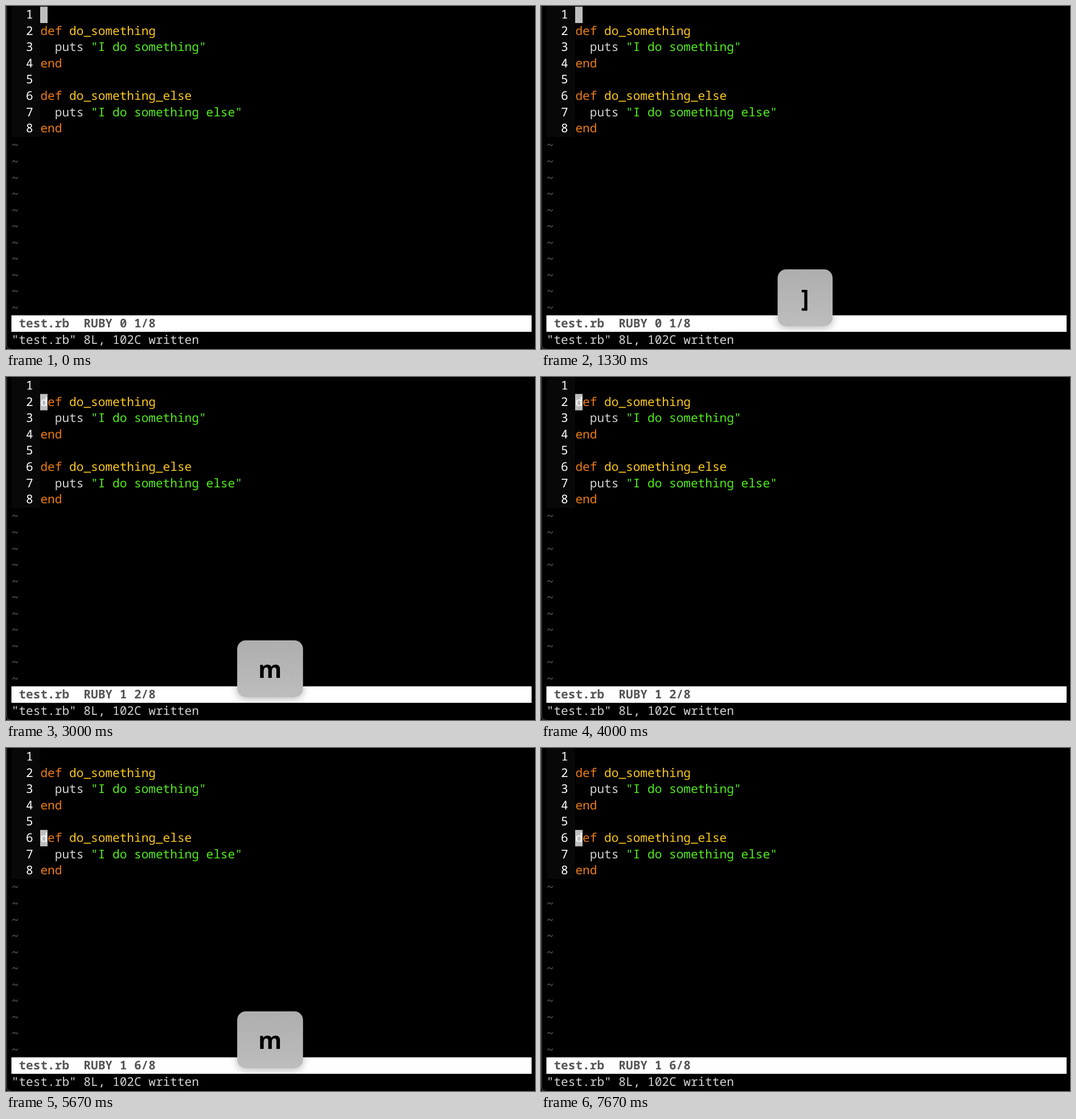
Recreate the animation shown at these times as an HTML page. Size 929 by 603 pixels, loop 8000 ms.

```html
<!DOCTYPE html>
<html lang="en">
<head>
<meta charset="utf-8">
<style>
html, body { margin: 0; width: 100%; height: 100%; overflow: hidden; background: #000; }
svg { display: block; width: 929px; height: 603px; }
text { white-space: pre; text-rendering: geometricPrecision; }
.mono { font: 21.1px "Noto Sans Mono", "DejaVu Sans Mono", monospace; }
.label { font: bold 42px "Open Sans", "Noto Sans", sans-serif; text-anchor: middle; }
</style>
</head>
<body>
<svg id="stage" viewBox="0 0 929 603">
  <defs>
    <linearGradient id="face" x2="0" y2="1">
      <stop stop-color="#aeaeae"/>
      <stop offset="1" stop-color="#bdbdbd"/>
    </linearGradient>
    <filter id="shadow" x="-40%" y="-40%" width="180%" height="180%">
      <feDropShadow dx="0" dy="3" stdDeviation="7" flood-opacity=".28"/>
    </filter>
  </defs>
  <path d="M1 0V596Q1 603 8 603" fill="none" stroke="#303030" stroke-width="2"/>
  <rect x="10" width="50" height="230" fill="#080808"/>
  <rect x="9.5" y="543.8" width="913.5" height="29" fill="#fff"/>
  <g id="screen" class="mono"></g>
  <g id="cursor" class="mono">
    <rect x="60" y="1.2" width="13" height="28.8" fill="#bebebe"/>
  </g>
  <g id="key">
    <rect id="cap" y="463" height="100" rx="15" fill="url(#face)" filter="url(#shadow)"/>
    <text id="label" class="label" x="463.6" y="529"></text>
  </g>
</svg>
<script>
const COL = 12.66, ROW = 28.57, LEFT = 9.8, BASE = 22.2;
const ORANGE = '#ee7d16', YELLOW = '#fcca1c', GREEN = '#52ee1c', PLAIN = '#d4d4d4';
const $ = id => document.getElementById(id);

function write(row, col, str, fill, parent = $('screen')) {
  const el = document.createElementNS('http://www.w3.org/2000/svg', 'text');
  el.setAttribute('x', LEFT + col * COL);
  el.setAttribute('y', BASE + (row - 1) * ROW);
  el.setAttribute('fill', fill);
  el.textContent = str;
  parent.append(el);
  return el;
}

function method(row, name, message) {
  write(row, 4, 'def', ORANGE);
  write(row, 8, name, YELLOW);
  write(row + 1, 6, 'puts', PLAIN);
  write(row + 1, 11, `"${message}"`, GREEN);
  write(row + 2, 4, 'end', ORANGE);
}

for (let row = 1; row < 20; row++) {
  if (row < 9) write(row, 2, row, '#fff');
  else write(row, 0, '~', '#5c6262').setAttribute('dy', 1.6);
}
method(2, 'do_something', 'I do something');
method(6, 'do_something_else', 'I do something else');
write(21, 0, '"test.rb" 8L, 102C written', PLAIN);
const status = write(20, 1, '', '#555');
status.setAttribute('font-weight', 600);
const letter = write(1, 4, 'd', '#fff', $('cursor'));

// [start ms, cursor row, pressed key]
const steps = [
  [0, 1, ''], [1330, 1, ']'], [2330, 2, 'm'], [4000, 2, ''],
  [4670, 2, ']'], [5330, 6, 'm'], [7000, 6, '']
];
let shown;

function show(step) {
  const [, row, key] = step, width = key === 'm' ? 115.5 : 96.5;
  $('cursor').setAttribute('transform', `translate(0 ${(row - 1) * ROW})`);
  letter.textContent = row > 1 ? 'd' : '';
  status.textContent = `test.rb  RUBY ${row > 1 ? 1 : 0} ${row}/8`;
  $('key').style.display = key ? '' : 'none';
  $('cap').setAttribute('x', 463.8 - width / 2);
  $('cap').setAttribute('width', width);
  $('label').textContent = key;
}

function frame() {
  const t = performance.now() % 8000;
  const step = steps.findLast(([start]) => t >= start);
  if (step !== shown) show(shown = step);
  requestAnimationFrame(frame);
}
frame();
</script>
</body>
</html>
```
